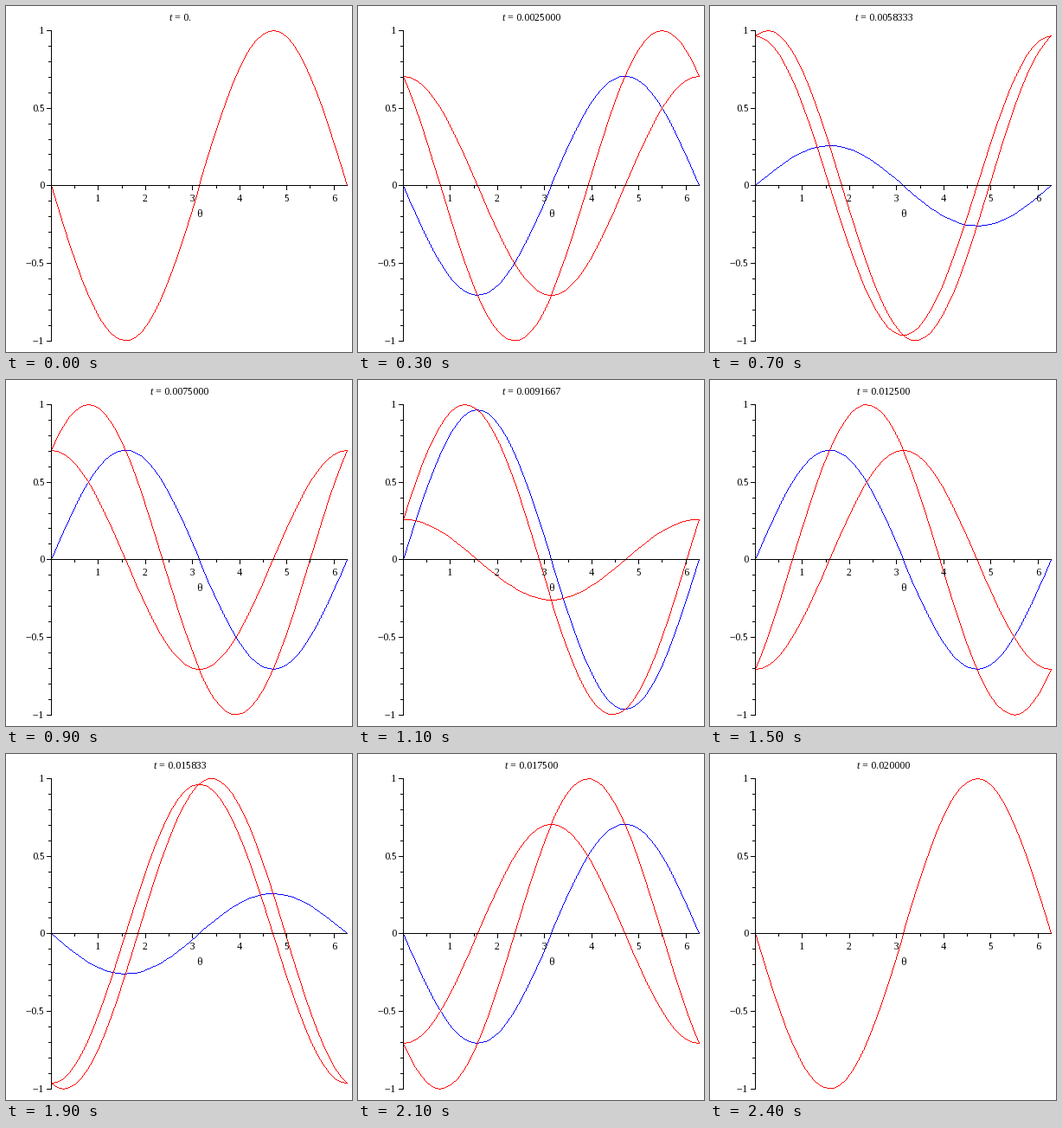
A matplotlib script for the animation above (2.5 s loop, 400 px wide and 400 px high).

```python
import matplotlib.pyplot as plt
import numpy as np
from matplotlib.animation import FuncAnimation
from matplotlib.collections import PolyCollection
from matplotlib.patches import Rectangle

plt.rcParams.update({
    "font.family": "Liberation Serif",
    "font.size": 8.64,
    "text.hinting": "force_autohint",
    "text.hinting_factor": 1,
    "mathtext.fontset": "custom",
    "mathtext.rm": "Liberation Serif",
    "mathtext.it": "Liberation Serif:italic",
})

SIZE, DPI = 400, 100
STEPS = 24
PERIOD = 0.02
LEFT, RIGHT = 52, 394
MID, AMP = 207.3, 179.25
RED, BLUE, BLACK = "#ff0000", "#0000ff", "#000000"
UNIT = np.array([[0, 0], [1, 0], [1, 1], [0, 1]])

fig = plt.figure(figsize=(SIZE / DPI, SIZE / DPI), dpi=DPI, facecolor="white")
ax = fig.add_axes([0, 0, 1, 1])
ax.set(xlim=(0, SIZE), ylim=(SIZE, 0))
ax.axis("off")


def px(x):
    return np.rint(LEFT + (RIGHT - LEFT) * x / (2 * np.pi))


def py(y):
    return np.rint(MID - AMP * y)


def bar(x0, y0, x1, y1):
    """Fill whole pixels from (x0, y0) to (x1, y1), both included."""
    ax.add_patch(Rectangle((x0, y0), x1 - x0 + 1, y1 - y0 + 1,
                           fc=BLACK, lw=0, zorder=4))


def label(x, y, text, ha="center"):
    return ax.text(x, y, text, ha=ha, va="baseline", color=BLACK, zorder=5)


def curve(color, z):
    squares = PolyCollection([], facecolor=color, lw=0, zorder=z)
    return ax.add_collection(squares, autolim=False)


def trace(xs, ys):
    """Squares of a crisp, one pixel wide polyline."""
    pts = np.column_stack([xs, ys])
    parts = []
    for a, b in zip(pts, pts[1:]):
        n = int(np.abs(b - a).max())
        parts.append(np.rint(np.linspace(a, b, n + 1)))
    cells = np.unique(np.vstack(parts), axis=0)
    return cells[:, None, :] + UNIT


def draw_axes():
    bar(LEFT, py(1), LEFT, py(-1))
    bar(LEFT, py(0), RIGHT, py(0))
    for i in range(-10, 11):
        y = py(i / 10)
        bar(47 if i % 5 == 0 else 49, y, LEFT, y)
    for i in range(1, 13):
        x = px(i / 2)
        bar(x, py(0), x, 212 if i % 2 == 0 else 210)
    for v in (-1, -0.5, 0, 0.5, 1):
        label(44, py(v) + 4, f"{v:g}".replace("-", "\u2212"), "right")
    for v in range(1, 7):
        label(px(v), 226, str(v))
    label(px(np.pi), 244, "\u03b8")


draw_axes()
theta = np.linspace(0, 2 * np.pi, 50)
standing_sin = curve(BLUE, 1)
standing_cos = curve(RED, 2)
travelling = curve(RED, 3)
title = label(201, 17, "")


def update(k):
    phase = 2 * np.pi * k / STEPS
    a = -np.cos(phase) * np.sin(theta)
    b = np.sin(phase) * np.cos(theta)
    for line, y in ((standing_sin, a), (standing_cos, b), (travelling, a + b)):
        line.set_verts(trace(px(theta), py(y)))
    t = f"{PERIOD * k / STEPS:#.5g}" if k else "0."
    title.set_text(f"$t$ = {t}")
    return standing_sin, standing_cos, travelling, title


anim = FuncAnimation(fig, update, frames=STEPS + 1, interval=100,
                     repeat=True, repeat_delay=0, blit=False)
plt.show()
```
